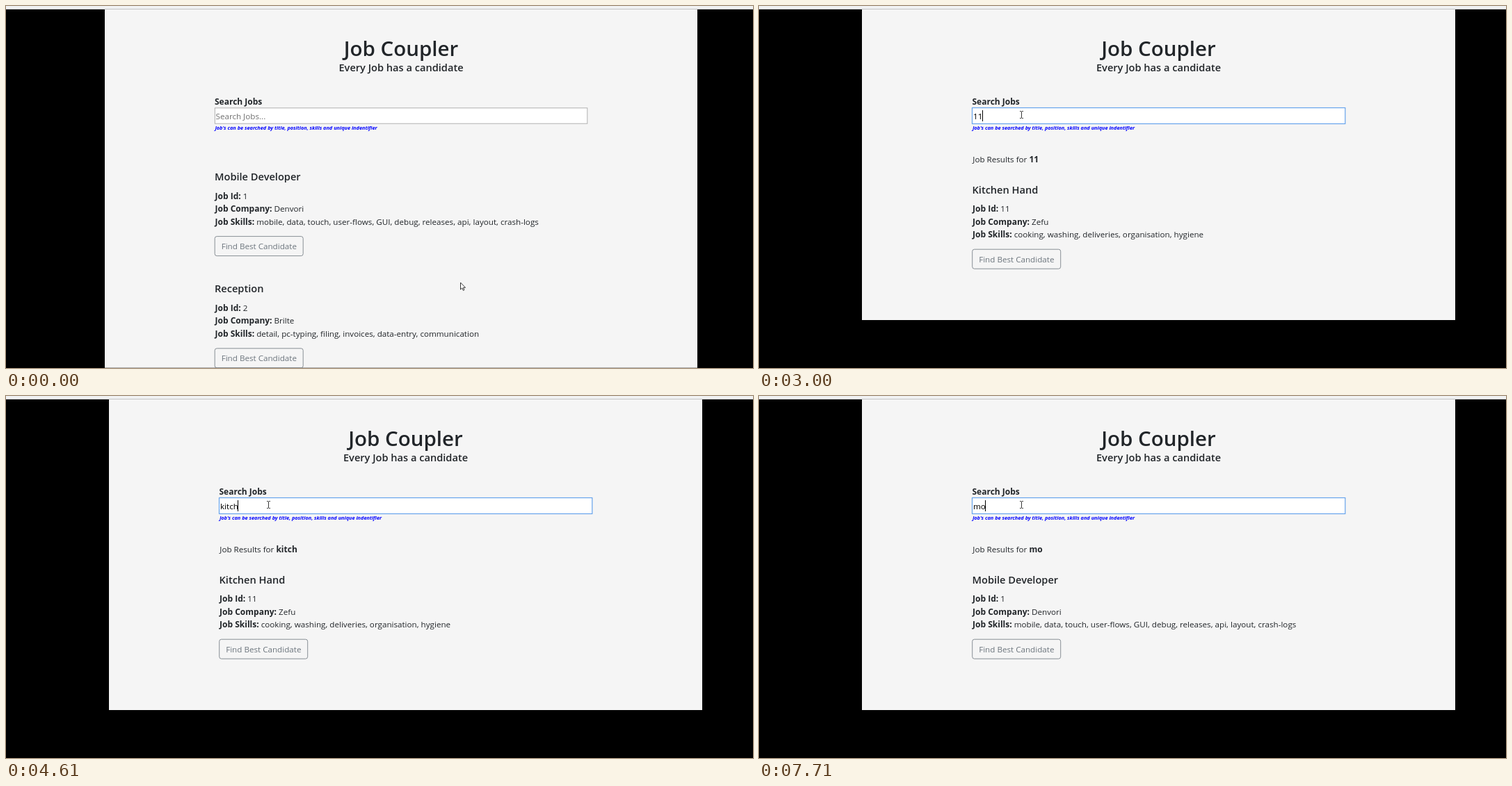
Animation, 1074 px wide and 521 px high, one loop 8 s. Source, as an HTML page:

```html
<!DOCTYPE html>
<html lang="en">
<head>
<meta charset="utf-8">
<title>Job search</title>
<style>
  html, body { margin: 0; width: 100%; height: 100%; overflow: hidden; background: #000; }
  svg { display: block; width: 1074px; height: 521px; }
  text { font: 11.65px "Open Sans", "Noto Sans", sans-serif; fill: #212529; white-space: pre; }
  .b { font-weight: 700; font-size: 12px; }
  .h1 { font-weight: 600; font-size: 29.5px; text-anchor: middle; }
  .h2 { font-weight: 600; font-size: 14.6px; }
  .mid { text-anchor: middle; }
  .hint { font-weight: 700; font-style: italic; font-size: 7.34px; fill: #00f; }
  .btn { fill: #6c757d; text-anchor: middle; }
  .empty { fill: #707070; }
  .typed { fill: #000; }
</style>
</head>
<body>
<svg id="stage" viewBox="0 0 1074 521"></svg>
<script>
const LOOP = 8000, BLINK = 540, ROW = 18.6, JOB_STEP = 161.2;

const jobs = {
  mobile: ['Mobile Developer', 1, 'Denvori',
    'mobile, data, touch, user-flows, GUI, debug, releases, api, layout, crash-logs'],
  desk: ['Reception', 2, 'Brilte', 'detail, pc-typing, filing, invoices, data-entry, communication'],
  chef: ['Head Chef', 4, 'Grolfit', 'creativity, cooking, ordering, cleanliness, service'],
  pharm: ['Pharmacist', 6, 'Tovanel', 'board-registration, communication, prescriptions, advice'],
  dental: ['Dental Assistant', 10, 'Trevu', 'dental-assisting, reception, sterilisation, reliable'],
  kitchen: ['Kitchen Hand', 11, 'Zefu', 'cooking, washing, deliveries, organisation, hygiene']
};

const results = { '': 'mobile desk', 1: 'mobile dental', 11: 'kitchen', k: 'mobile desk',
  ki: 'chef pharm', m: 'mobile desk', mo: 'mobile' };

// Each entry: start time, text in the search field
const typing = [
  [1470, ''], [1770, '1'], [1910, '11'], [3310, '1'], [3450, ''],
  [3910, 'k'], [4160, 'ki'], [4250, 'kit'], [4470, 'kitc'], [4610, 'kitch'], [4700, 'kitche'],
  [4860, 'kitchen'], [5460, 'kitche'], [5640, 'kitch'], [5770, 'kitc'], [5930, 'kit'],
  [6100, 'ki'], [6330, 'k'], [6410, ''], [7490, 'm'], [7710, 'mo']
];

// Pointer stops: time, x, y
const pointer = [
  [0, 653.5, 398], [70, 640, 386], [150, 596, 348], [225, 530, 298], [300, 455, 246],
  [375, 385, 200], [450, 340, 172], [530, 323, 158], [605, 356, 152], [680, 381, 150],
  [900, 381.5, 151], [990, 381, 153], [1070, 379.5, 155], [1160, 378.5, 156], [1310, 377.5, 156.5]
];

const stage = document.getElementById('stage');
const pen = document.createElement('canvas').getContext('2d');
pen.font = '11.65px "Open Sans", "Noto Sans", sans-serif';

const at = (list, t) => list.filter(e => e[0] <= t).pop();
const text = (x, y, s, cls = '') => `<text x="${x}" y="${y}" class="${cls}">${s}</text>`;
const rect = (x, y, w, h, attrs) => `<rect x="${x}" y="${y}" width="${w}" height="${h}" ${attrs}/>`;
const bold = s => `<tspan class="b">${s}</tspan>`;

function drawJob([title, id, company, skills], x, y) {
  const rows = [['Id', id], ['Company', company], ['Skills', skills]];
  return text(x, y, title, 'h2') +
    rows.map(([name, value], i) =>
      text(x + .6, y + 26.6 + i * ROW, bold(`Job ${name}:`) + ' ' + value)).join('') +
    rect(x + .2, y + 80.6, 127, 28, 'rx="3" fill="none" stroke="#6c757d" stroke-width=".8"') +
    text(x + 63.8, y + 99.2, 'Find Best Candidate', 'btn');
}

function drawPointer(x, y) {
  const beam = y < 170;
  const d = beam ? 'M-2.5-5H-.8L0-4.4.8-5H2.5M0-4.4V4.4M-2.5 5H-.8L0 4.4.8 5H2.5'
                 : 'M0 0V10l2.3-2.1 1.6 3.5 1.5-.7L3.9 7.3H7z';
  return `<path transform="translate(${x} ${y})" d="${d}" fill="${beam ? 'none' : '#fff'}"
    stroke="#222" stroke-width=".9"/>`;
}

function draw(t) {
  const key = at(typing, t), query = key ? key[1] : '';
  const found = (results[query] || 'kitchen').split(' ');
  const single = found.length === 1;
  const mid = single ? 574.5 : 568, x = mid - 268;
  const left = Math.floor(mid - 426), right = Math.ceil(mid + 426);

  let out = rect(0, 0, 1074, 521, 'fill="#000"') +
    rect(left, 4, right - left, single ? 448 : 516.7, 'fill="#f5f5f5"') +
    rect(0, 0, 1074, 4, 'fill="#f1f2f3"') + rect(0, 4, 1074, 1, 'fill="#c4c4c4"') +
    text(mid, 72, 'Job Coupler', 'h1') +
    text(mid, 93.5, 'Every Job has a candidate', 'h2 mid') +
    text(x, 142.2, 'Search Jobs', 'b') +
    (key ? rect(x, 146.5, 536.3, 23, 'fill="#fff" stroke="#66a3ec" stroke-width="1.2"')
         : rect(x + .3, 146.8, 535.5, 22.4, 'fill="#fff" stroke="#a9a9a9" stroke-width=".9"')) +
    text(x + 1.5, 162.8, query || 'Search Jobs...', query ? 'typed' : 'empty') +
    text(x + .4, 178, "Job's can be searched by title, position, skills and unique indentifier", 'hint');

  if (key && Math.floor((t - key[0]) / BLINK) % 2 === 0)
    out += rect(Math.round(x + .8 + pen.measureText(query).width), 150, 1, 16, 'fill="#000"');
  if (query) out += text(x + .8, 225.4, 'Job Results for ' + bold(query));

  const top = query ? 251 + ROW : 251;
  found.forEach((name, i) => out += drawJob(jobs[name], x, top + i * JOB_STEP));
  const [, px, py] = at(pointer, t);
  return out + drawPointer(px, py);
}

let shown;
const start = performance.now();
function tick() {
  const next = draw(Math.max(0, performance.now() - start) % LOOP);
  if (next !== shown) stage.innerHTML = shown = next;
  requestAnimationFrame(tick);
}
tick();
</script>
</body>
</html>
```
